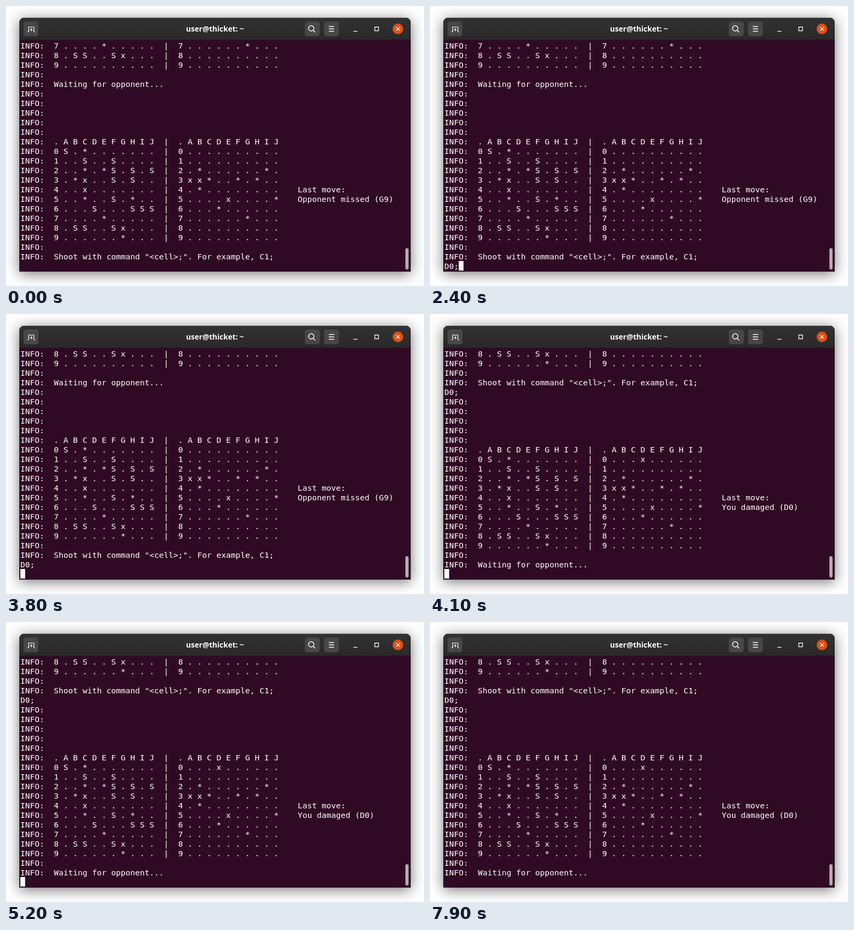
Recreate the animation shown at these times as an HTML page with a canvas. Size 786 by 526 pixels, loop 8 s.

```html
<!DOCTYPE html>
<html lang="en">
<head>
<meta charset="utf-8">
<title>Terminal game</title>
<style>
  html, body { margin: 0; width: 100%; height: 100%; overflow: hidden; background: #fff; }
  canvas { display: block; }
</style>
</head>
<body>
<canvas id="stage" width="786" height="526"></canvas>
<script>
const ctx = document.getElementById('stage').getContext('2d');

const LOOP = 8000, TICK = 100, BLINK = 588;
const COL = 9, ROW = 18, LEFT = 27, TOP = 65, INPUT_ROW = 23;
const KEYS = [[1100, 'D'], [1700, '0'], [2100, ';']];
const ENTER = 2600, REPLY = 4000, FIRST_CURSOR = 400;

// Game boards
const OWN = ['S.*.......', '..S..S....', '..*.*S.S.S', '.*x..S.S..', '..x.......',
             '..*..S.*..', '...S...SSS', '....*.....', '.SS..Sx...', '......*...'];
const ENEMY = ['..........', '..........', '.*......*.', 'xx*..*.*..', '.*........',
               '....x....*', '...*......', '......*...', '..........', '..........'];
const EMPTY = '..........';

const info = (text = '') => 'INFO:  ' + text;
const blanks = n => Array(n).fill(info());
const spaced = cells => [...cells].join(' ');
const boardRow = (label, own, enemy, note = '') =>
  info(`${label} ${spaced(own)}  |  ${label} ${spaced(enemy)}    ${note}`);

function board(enemy, lastMove) {
  const notes = { 4: 'Last move:', 5: lastMove };
  return [
    boardRow('.', 'ABCDEFGHIJ', 'ABCDEFGHIJ'),
    ...OWN.map((own, i) => boardRow(i, own, enemy[i], notes[i])),
    info()
  ];
}

const WAITING = info('Waiting for opponent...');
const SHOOT = info('Shoot with command "<cell>;". For example, C1;');

const history = [
  boardRow(7, OWN[7], ENEMY[7]), boardRow(8, OWN[8], ENEMY[8]), boardRow(9, EMPTY, EMPTY),
  info(), WAITING, ...blanks(5),
  ...board(ENEMY, 'Opponent missed (G9)'), SHOOT
];
const entered = [...history, 'D0;'];
const answered = [
  ...entered, ...blanks(5),
  ...board(['...x......', ...ENEMY.slice(1)], 'You damaged (D0)'), WAITING
];

// Drawing helpers
function box(x, y, w, h, radius, color) {
  ctx.fillStyle = color;
  ctx.beginPath();
  ctx.roundRect(x, y, w, h, radius);
  ctx.fill();
}

function stroke(path, width = 1.4) {
  ctx.strokeStyle = '#fff';
  ctx.lineWidth = width;
  ctx.stroke(new Path2D(path));
}

function drawWindow() {
  ctx.fillStyle = '#fff';
  ctx.fillRect(0, 0, 786, 526);

  ctx.save();
  ctx.shadowColor = 'rgba(0,0,0,.55)';
  ctx.shadowBlur = 26;
  ctx.shadowOffsetY = 4;
  box(25, 22, 736, 477, [9, 9, 0, 0], '#1d1019');
  ctx.restore();

  const bar = ctx.createLinearGradient(0, 22, 0, 64);
  bar.addColorStop(0, '#323232');
  bar.addColorStop(1, '#292929');
  box(25, 22, 736, 42, [9, 9, 0, 0], bar);
  box(33, 22, 720, 1, 0, '#434343');
  box(25, 63, 736, 1, 0, '#1d1d1d');
  box(26, 64, 734, 434, 0, '#300a24');

  for (const x of [33, 562, 598]) {
    box(x, 29, 28, 28, 5, '#474747');
  }
  stroke('M40 48.5H42.5V39.5H52.5V48.5H55M47.5 41.5V47.5M44.5 44.5H50.5', 1.2);
  stroke('M579 42a5 5 0 1 1-10 0a5 5 0 1 1 10 0M577.7 45.7L581.5 49.5');
  stroke('M607 38.5H617M607 43H617M607 47.5H617', 1.5);
  stroke('M653 47.5H661', 1.3);
  stroke('M693.5 39.5H700.5V46.5H693.5Z', 1.3);
  box(727, 33, 20, 20, 10, '#e04f16');
  stroke('M733.5 39.5L740.5 46.5M740.5 39.5L733.5 46.5', 1.3);

  ctx.font = 'bold 14px "Noto Sans", "Open Sans", sans-serif';
  ctx.textAlign = 'center';
  ctx.fillStyle = '#fff';
  ctx.fillText('user@thicket: ~', 393, 48);
  box(751, 455, 6, 40, 3, '#b5aab2');
}

function cursorVisible(t) {
  if (t < FIRST_CURSOR) return false;
  if (t < KEYS[0][0]) return true;
  const lastKey = [...KEYS.map(key => key[0]), ENTER].filter(time => time <= t).pop();
  return Math.floor((t - lastKey) / BLINK) % 2 === 0;
}

function drawTerminal(t) {
  const lines = t < ENTER ? history : t < REPLY ? entered : answered;
  const typed = t < ENTER
    ? KEYS.filter(([time]) => time <= t).map(([, key]) => key).join('')
    : '';

  ctx.font = '14.95px "DejaVu Sans Mono", monospace';
  ctx.textAlign = 'left';
  ctx.fillStyle = '#fff';
  [...lines.slice(-INPUT_ROW), typed].forEach((line, row) => {
    ctx.fillText(line, LEFT, TOP + row * ROW + 15);
  });
  if (cursorVisible(t)) {
    ctx.fillRect(LEFT + typed.length * COL, TOP + INPUT_ROW * ROW, COL, ROW);
  }
}

const start = performance.now();
function frame() {
  const elapsed = (performance.now() - start) % LOOP;
  drawWindow();
  drawTerminal(Math.floor(elapsed / TICK) * TICK);
  requestAnimationFrame(frame);
}
frame();
</script>
</body>
</html>
```
